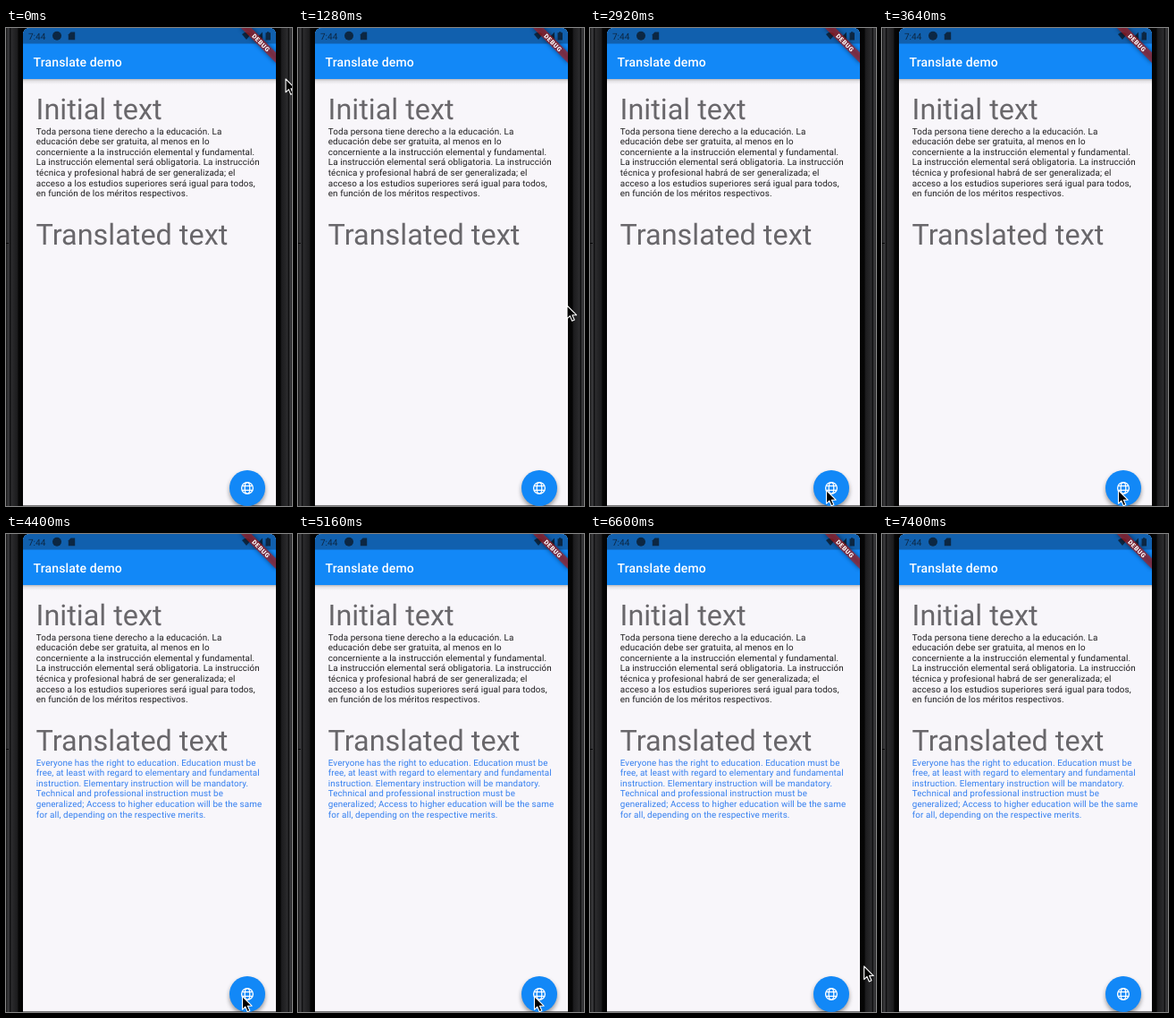
An HTML page for the animation above (7.44 s loop, 320 by 534 pixels).

```html
<!DOCTYPE html>
<html lang="en">
<head>
<meta charset="utf-8">
<title>Translate demo</title>
<style>
  html, body { margin: 0; width: 100%; height: 100%; overflow: hidden; background: #000; }
  svg { display: block; width: 320px; height: 534px; }
  text { font-family: Roboto, "Noto Sans", sans-serif; white-space: pre; text-rendering: geometricPrecision; }
  .title { font-size: 14px; font-weight: 500; letter-spacing: .1px; fill: #fff; }
  .head { font-size: 32.4px; fill: #69676b; }
  .body { font-size: 9.85px; letter-spacing: .1px; fill: #1d1c1e; }
  #translated { fill: #347ff0; }
</style>
</head>
<body>
<svg viewBox="0 0 320 534">
  <defs>
    <linearGradient id="bezel">
      <stop offset="0" stop-color="#161617"/>
      <stop offset=".1" stop-color="#363638"/>
      <stop offset=".2" stop-color="#363638"/>
      <stop offset=".24" stop-color="#0c0c0d"/>
      <stop offset=".32" stop-color="#2b2b2d"/>
      <stop offset=".66" stop-color="#1c1c1e"/>
      <stop offset=".74" stop-color="#060606"/>
      <stop offset="1" stop-color="#030303"/>
    </linearGradient>
    <linearGradient id="shade" x2="0" y2="1">
      <stop offset="0" stop-color="#000" stop-opacity=".25"/>
      <stop offset=".4" stop-color="#000" stop-opacity=".08"/>
      <stop offset="1" stop-color="#000" stop-opacity="0"/>
    </linearGradient>
    <filter id="blur" x="-50%" y="-150%" width="200%" height="400%">
      <feGaussianBlur stdDeviation="2.5"/>
    </filter>
    <clipPath id="screen"><path d="M19 534V8Q19 0 27 0H294Q302 0 302 8V534z"/></clipPath>
  </defs>

  <!-- phone body -->
  <path id="side" fill="url(#bezel)" d="M0 0H19V534H0z"/>
  <use href="#side" transform="matrix(-1 0 0 1 321 0)"/>
  <path fill="#060606" d="M0 240H3V241H0z"/>

  <g clip-path="url(#screen)">
    <path fill="#f8f6fa" d="M19 0H302V533.5H19z"/>
    <path fill="url(#shade)" d="M19 57H302V63H19z"/>
    <path fill="#1288f7" d="M19 0H302V57H19z"/>
    <path fill="#1160ae" d="M19 0H302V17.5H19z"/>

    <!-- status bar -->
    <g fill="#0c2743">
      <text x="25" y="12.6" font-size="10">7:44</text>
      <circle cx="57" cy="8.8" r="5"/>
      <path d="M72.5 4.5H77.2V13.2H69.8V7.2z"/>
      <path d="M264 7Q269 2.5 274 7L269 13z"/>
      <path d="M287 4.5V13H279z"/>
      <path d="M290.5 5.2H292V4.2H294.4V5.2H296V13.4H290.5z"/>
    </g>

    <text class="title" x="30.6" y="42.6">Translate demo</text>
    <text class="head" x="33.6" y="101.8">Initial text</text>
    <g class="body" id="initial"></g>
    <text class="head" x="33.6" y="241.8">Translated text</text>
    <g class="body" id="translated"></g>

    <!-- action button -->
    <circle cx="270" cy="517" r="20" fill="#000" opacity=".4" filter="url(#blur)"/>
    <circle cx="270" cy="514" r="20" fill="#1288f7"/>
    <g fill="none" stroke="#fff" stroke-width="1.3">
      <circle cx="270" cy="514" r="6.4"/>
      <ellipse cx="270" cy="514" rx="2.8" ry="6.4"/>
      <path d="M264.2 511.7H275.8M264.2 516.3H275.8"/>
    </g>

    <!-- corner ribbon: shadow below, translucent red above -->
    <g transform="translate(302 0) rotate(45)">
      <path d="M-28 19.3H28V27.6H-28z" fill="#000" opacity=".5" filter="url(#blur)"/>
      <path d="M-28 19.3H28V27.6H-28z" fill="#b71c1c" opacity=".63"/>
      <text y="26" text-anchor="middle" font-size="7" font-weight="900"
            letter-spacing=".6" fill="#fff">DEBUG</text>
    </g>
  </g>

  <path id="cursor" d="M0 0V14.8L3.3 11.6L5.7 17.2L8.3 16L5.9 10.7H10.6z"
        fill="#000" stroke="#fff" stroke-width="1.1" stroke-linejoin="round"/>
</svg>
<script>
const LOOP = 7440, STEP = 40, SHOW_AT = 3960, LEAVE_AT = 6800;

// time, x, y of the pointer tip
const path = [
  [0, 313, 57], [760, 302, 185], [1280, 301, 310], [1560, 291, 392],
  [2000, 264.5, 516.5], [5400, 264.5, 516.5], [5760, 268.5, 511],
  [6160, 268.5, 511], [LEAVE_AT, 324, 470]
];

const byId = id => document.getElementById(id);

function addLines(id, y, lines) {
  byId(id).innerHTML = lines
    .map((line, i) => `<text x="33.8" y="${y + i * 11.55}">${line}</text>`).join("");
}

addLines("initial", 118.8, [
  "Toda persona tiene derecho a la educación. La",
  "educación debe ser gratuita, al menos en lo",
  "concerniente a la instrucción elemental y fundamental.",
  "La instrucción elemental será obligatoria. La instrucción",
  "técnica y profesional habrá de ser generalizada; el",
  "acceso a los estudios superiores será igual para todos,",
  "en función de los méritos respectivos."
]);
addLines("translated", 258.8, [
  "Everyone has the right to education. Education must be",
  "free, at least with regard to elementary and fundamental",
  "instruction. Elementary instruction will be mandatory.",
  "Technical and professional instruction must be",
  "generalized; Access to higher education will be the same",
  "for all, depending on the respective merits."
]);

function pointerAt(t) {
  const i = path.findIndex(p => p[0] > t);
  const [t0, x0, y0] = path[i - 1], [t1, x1, y1] = path[i];
  const k = (t - t0) / (t1 - t0);
  return [x0 + (x1 - x0) * k, y0 + (y1 - y0) * k];
}

function draw(now) {
  const t = Math.floor(now % LOOP / STEP) * STEP;
  const visible = t < LEAVE_AT;
  byId("translated").style.display = t < SHOW_AT ? "none" : "";
  byId("cursor").style.display = visible ? "" : "none";
  if (visible) byId("cursor").setAttribute("transform", `translate(${pointerAt(t)})`);
}

const start = performance.now();
function tick() {
  draw(performance.now() - start);
  requestAnimationFrame(tick);
}
tick();
</script>
</body>
</html>
```
